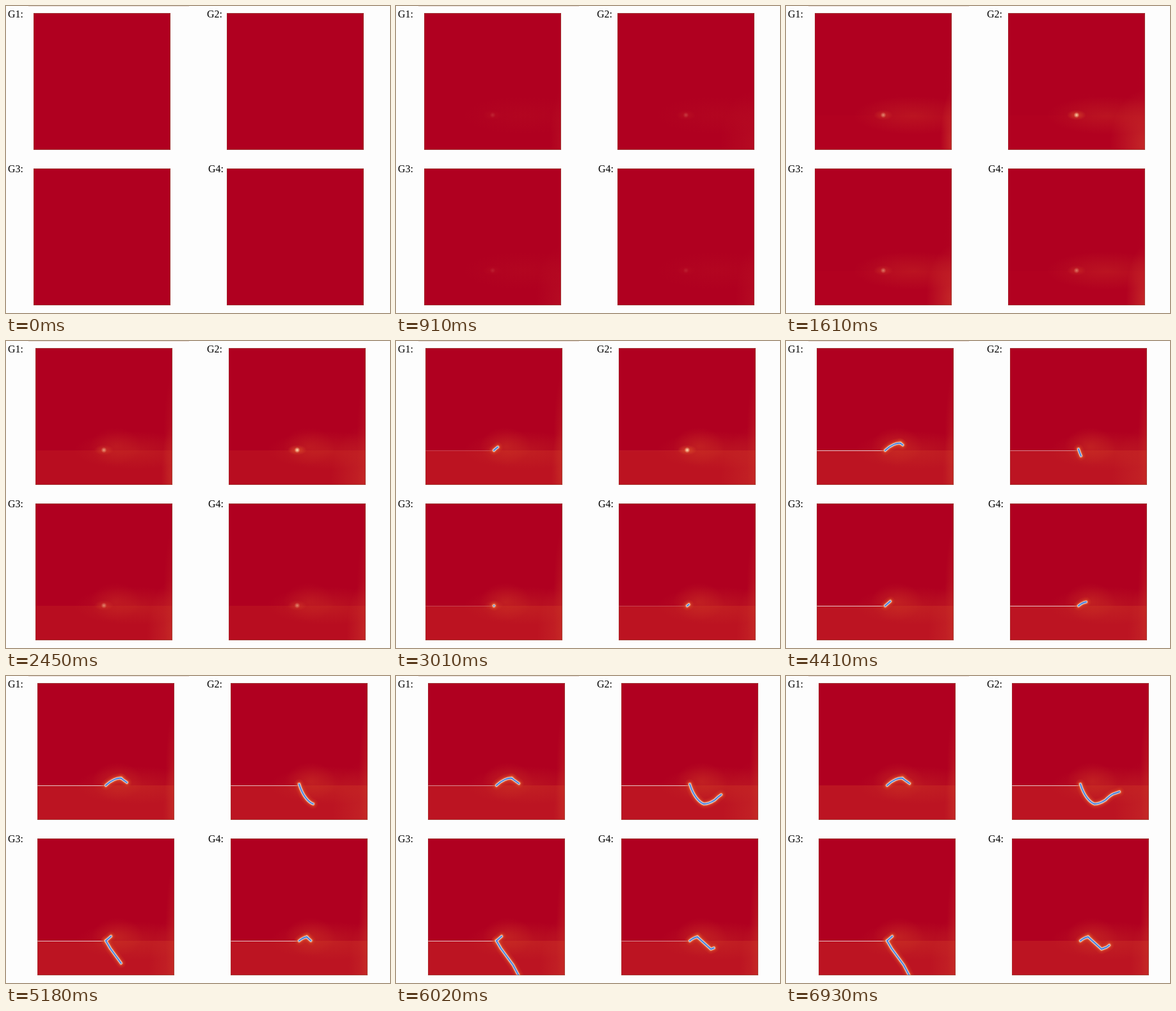
An HTML page with a canvas for the animation above (7000 ms loop, 600 by 480 pixels).

```html
<!DOCTYPE html>
<html>
<head>
<meta charset="utf-8">
<style>
html, body { margin: 0; height: 100%; overflow: hidden; background: #fdfdfd; }
canvas { display: block; }
</style>
</head>
<body>
<canvas id="stage" width="600" height="480"></canvas>
<script>
const ctx = document.getElementById('stage').getContext('2d');
const LOOP = 7000, STEP = 70, SIZE = 214, TIP_X = 107, TIP_Y = 160;

function crack(d, from, to) {
  const el = document.createElementNS('http://www.w3.org/2000/svg', 'path');
  el.setAttribute('d', d);
  return { path: new Path2D(d), length: el.getTotalLength(), from, to };
}

// Crack paths are relative to the plate; times are in ms.
const panels = [
  { labelX: 3, corner: 18, spot: .6, opened: 3600, closes: true, cracks: [
    crack('M107 160Q113 154 120 151T131 149', 2700, 3570),
    crack('M131 149L135 152L142 157', 3600, 5800)] },
  { labelX: 314, corner: 55, spot: 1, opened: 5600, cracks: [
    crack('M107 158Q111 171 117 179T129 189Q137 189 146 183Q153 176 158 173.5L168 170', 3700, 6800)] },
  { labelX: 3, corner: 40, spot: .5, opened: 3600, cracks: [
    crack('M107 160L115 153', 2900, 4100),
    crack('M107 160L114 172L133 198L142 215', 4700, 5500)] },
  { labelX: 316, corner: 30, spot: .5, opened: 3600, closes: true, cracks: [
    crack('M107 160Q113 155 119 154', 2700, 3700),
    crack('M119 154L140 173L148 170L152 167', 4600, 6600)] }
];

// From the wide glow to the blue core.
const layers = [
  [15, 'rgba(214,64,35,.2)'], [10, 'rgba(222,80,45,.3)'],
  [6.5, 'rgba(235,130,85,.5)'], [4.6, 'rgba(245,190,155,.75)'],
  [3.2, '#d6dcea'], [1.9, '#4a80de']
];

function ease(t, from, to) {
  const s = Math.max(0, Math.min(1, (t - from) / (to - from)));
  return s * s * (3 - 2 * s);
}

function glow(x, y, rx, ry, rgb, alpha) {
  ctx.save();
  ctx.translate(x, y);
  ctx.scale(rx, ry);
  const g = ctx.createRadialGradient(0, 0, 0, 0, 0, 1);
  g.addColorStop(0, `rgba(${rgb},${alpha})`);
  g.addColorStop(1, `rgba(${rgb},0)`);
  ctx.fillStyle = g;
  ctx.fillRect(-1, -1, 2, 2);
  ctx.restore();
}

function drawStress(p, t) {
  const early = ease(t, 500, 1700), load = ease(t, 1300, 3200);
  ctx.fillStyle = `rgba(204,48,36,${.42 * load})`;
  ctx.fillRect(0, TIP_Y, SIZE, SIZE - TIP_Y);
  glow(155, TIP_Y, 95, 30, '204,55,36', .35 * early);
  glow(SIZE, 205, p.corner, 85, '216,80,48', .5 * early * (1 - .5 * load));
  glow(SIZE, 150, 14, 110, '204,60,36', .35 * load);
  glow(125, 154, 40, 30, '208,60,36', .4 * load);

  const start = p.cracks[0].from;
  const spot = p.spot * ease(t, 500, 1900) * (1 - ease(t, start, start + 500));
  glow(TIP_X, TIP_Y - .5, 15, 8, '225,90,45', .7 * spot);
  glow(TIP_X, TIP_Y - .5, 4.5, 4.5, '255,225,180', spot);
}

function drawCracks(p, t) {
  const open = ease(t, 2700, p.opened) * (p.closes ? 1 - ease(t, 5500, 6900) : 1);
  ctx.fillStyle = `rgba(238,215,215,${.9 * open})`;
  ctx.fillRect(0, TIP_Y, TIP_X - 1, 1);

  ctx.lineCap = ctx.lineJoin = 'round';
  for (const [width, color] of layers) {
    ctx.lineWidth = width;
    ctx.strokeStyle = color;
    for (const c of p.cracks) {
      if (t <= c.from) continue;
      ctx.setLineDash([c.length * ease(t, c.from, c.to), 999]);
      ctx.stroke(c.path);
    }
  }
  ctx.setLineDash([]);
}

function drawPanel(p, i, t) {
  const x = 43.3 + 302 * (i % 2), y = 11 + 243 * (i >> 1);
  ctx.fillStyle = '#000';
  ctx.fillText(`G${i + 1}:`, p.labelX, y + 6.5 - .5 * (i >> 1));

  ctx.save();
  ctx.translate(Math.round(x + 7.3 * t / LOOP), y);
  ctx.beginPath();
  ctx.rect(0, 0, SIZE, SIZE);
  ctx.clip();
  ctx.fillStyle = '#b00020';
  ctx.fillRect(0, 0, SIZE, SIZE);
  drawStress(p, t);
  drawCracks(p, t);
  ctx.lineWidth = 1;
  ctx.strokeStyle = 'rgba(150,90,70,.6)';
  ctx.strokeRect(.5, .5, SIZE - 1, SIZE - 1);
  ctx.restore();
}

function draw(t) {
  ctx.fillStyle = '#fdfdfd';
  ctx.fillRect(0, 0, 600, 480);
  ctx.fillStyle = '#eadbd6';
  ctx.fillRect(35, 0, 251, 1);
  ctx.font = '16px "Liberation Serif", Times, serif';
  panels.forEach((p, i) => drawPanel(p, i, t));
}

const start = performance.now();
function tick() {
  const t = (performance.now() - start) % LOOP;
  draw(Math.floor(t / STEP) * STEP);
  requestAnimationFrame(tick);
}
tick();
</script>
</body>
</html>
```
